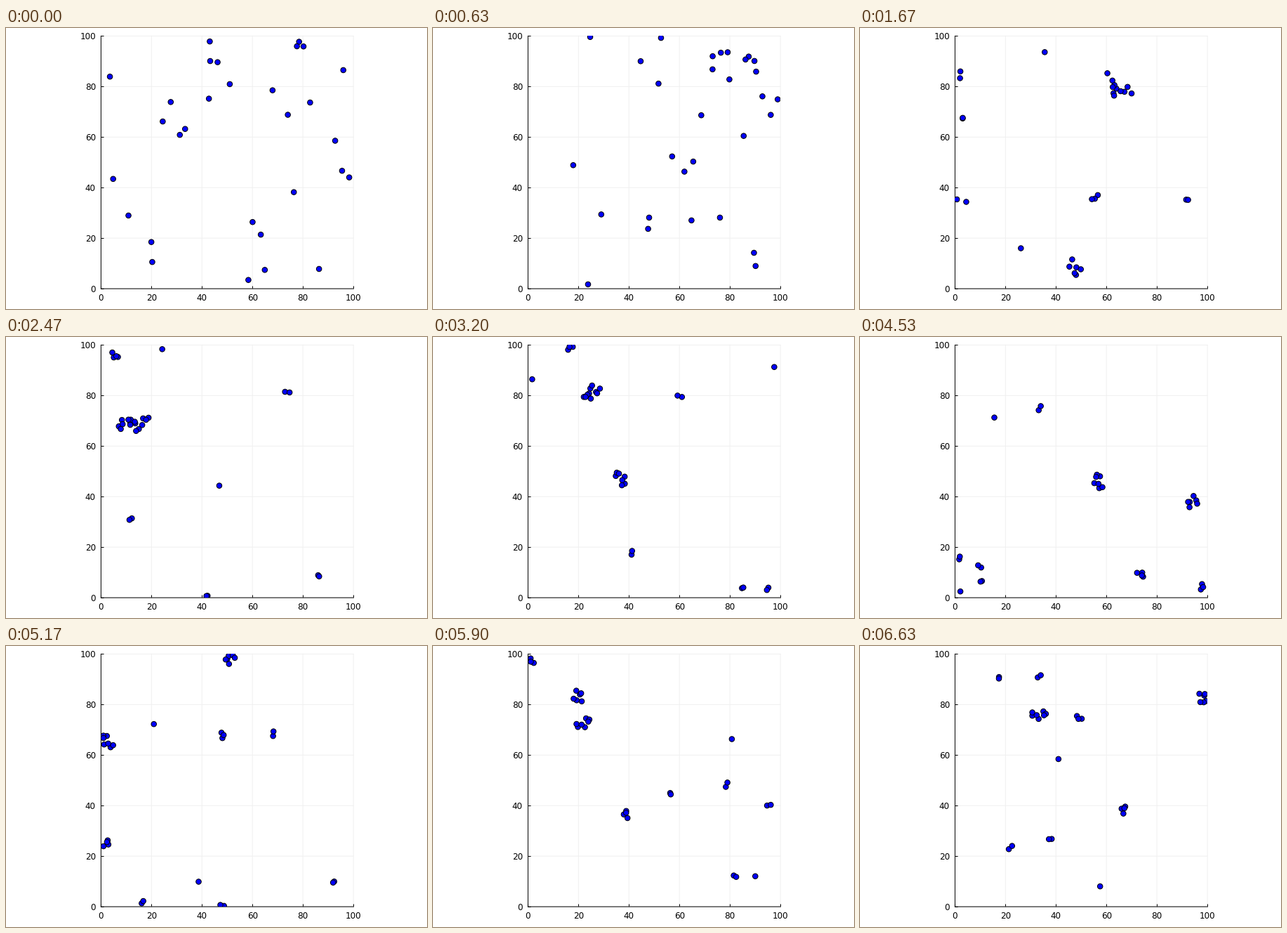
A matplotlib script that plays this animation: 600 px wide and 400 px high, repeating every 6660 ms.

```python
import matplotlib.pyplot as plt
import numpy as np
from matplotlib.animation import FuncAnimation

W, H, DPI = 600, 400, 100
SIZE, SPEED = 100, 2.3
FRAMES, LOOP = 200, 6660
GATHER = 60      # steps until the loose birds have joined their flocks
PT = 72 / DPI    # points per pixel

plt.rcParams["font.family"] = "DejaVu Sans"

# Flock size and a few points each flock passes, at the steps in TIMES
TIMES = np.array([50, 74, 118, 155, 199])
FLOCKS = [
    (7, [(66, 77), (9.5, 68.5), (86, 32), (3, 65.5), (33, 76.5)]),
    (6, [(48, 8), (14, 68), (71, 27), (51, 98.5), (98.5, 82.5)]),
    (4, [(62, 83), (5, 96), (60, 46), (2, 24.5), (66.5, 38)]),
    (3, [(56, 37), (18, 72), (58, 56), (47, 68), (50, 75.5)]),
    (2, [(2.5, 85), (74, 82), (1.3, 78), (67.6, 68.6), (22.5, 23)]),
    (2, [(92.5, 36), (86, 9), (60, 9), (92.5, 10), (17.4, 91)]),
    (2, [(2, 34), (12.5, 30.5), (14.3, 21), (17, 1), (38, 27.7)]),
    (2, [(4, 67), (42.5, 0), (18, 13.5), (48, 0), (33, 91.5)]),
    (1, [(28, 15), (47, 45), (42, 26), (38, 10), (58, 7.6)]),
    (1, [(36, 93), (24.5, 98), (18.5, 72), (20.6, 72), (41, 58)]),
]


def fold(u):
    """Bounce an endless path back into the box."""
    return SIZE - np.abs(SIZE - u % (2 * SIZE))


def unfold(p, goal):
    """Mirror image of p that lies nearest to the goal."""
    a, b = (q + 2 * SIZE * np.round((goal - q) / (2 * SIZE)) for q in (p, -p))
    return np.where(np.abs(a - goal) < np.abs(b - goal), a, b)


def plan(points):
    """Continue each leg in the old heading, bouncing off the walls."""
    path = [np.array(points[0], float)]
    heading = np.zeros(2)
    for gap, p in zip(np.diff(TIMES), points[1:]):
        goal = path[-1] + SPEED * gap * heading
        path.append(unfold(np.array(p, float), goal))
        step = path[-1] - path[-2]
        heading = step / max(np.hypot(*step), 1e-6)
    return path


sizes = np.array([size for size, _ in FLOCKS])
path = np.stack([plan(points) for _, points in FLOCKS], axis=1)
slope = np.gradient(path, TIMES, axis=0)

rng = np.random.default_rng(4)
count = sizes.sum()
stray = rng.normal(0, 40, (count, 2))
angle = rng.uniform(0, 2 * np.pi, count)
radius = np.sqrt(rng.uniform(0, 1, count)) * np.repeat(sizes - 0.4, sizes) ** 0.6


def centers(n):
    """Flock centres at step n: a straight approach, then smooth cubics."""
    if n < TIMES[0]:
        return path[0] + (n - TIMES[0]) * slope[0]
    k = min(np.searchsorted(TIMES, n, side="right") - 1, len(TIMES) - 2)
    gap = TIMES[k + 1] - TIMES[k]
    t = (n - TIMES[k]) / gap
    return ((1 + 2 * t) * (1 - t) ** 2 * path[k]
            + t * (1 - t) ** 2 * gap * slope[k]
            + t * t * (3 - 2 * t) * path[k + 1]
            + t * t * (t - 1) * gap * slope[k + 1])


def flock(n):
    """Bird positions: flock centre, slow turning, early scatter."""
    turn = angle + 0.02 * n
    close = radius[:, None] * np.column_stack([np.cos(turn), np.sin(turn)])
    loose = stray * max(0, 1 - n / GATHER) ** 2
    return fold(np.repeat(centers(n), sizes, axis=0) + close + loose)


fig = plt.figure(figsize=(W / DPI, H / DPI), dpi=DPI, facecolor="white")
ax = fig.add_axes([135.4 / W, 28.9 / H, 359.7 / W, 359.7 / H])
ax.set(xlim=(0, SIZE), ylim=(0, SIZE),
       xticks=range(0, 101, 20), yticks=range(0, 101, 20))
ax.set_axisbelow(True)
ax.grid(color="#f0f0f0", linewidth=PT, clip_on=False, snap=False)
ax.tick_params(direction="in", length=4 * PT, width=PT, labelsize=12 * PT)
ax.tick_params(axis="x", pad=6.5 * PT)
ax.tick_params(axis="y", pad=7.5 * PT)
for side, spine in ax.spines.items():
    spine.set(visible=side in ("left", "bottom"), linewidth=PT, zorder=1.5,
              snap=False)

birds = ax.scatter(*flock(0).T, s=np.full(count, (7.5 * PT) ** 2),
                   c="#0000ff", edgecolors="black", linewidths=PT, zorder=3)


def draw(n):
    birds.set_offsets(flock(n))
    return birds,


anim = FuncAnimation(fig, draw, frames=FRAMES, interval=LOOP / FRAMES,
                     repeat=True)
plt.show()
```
